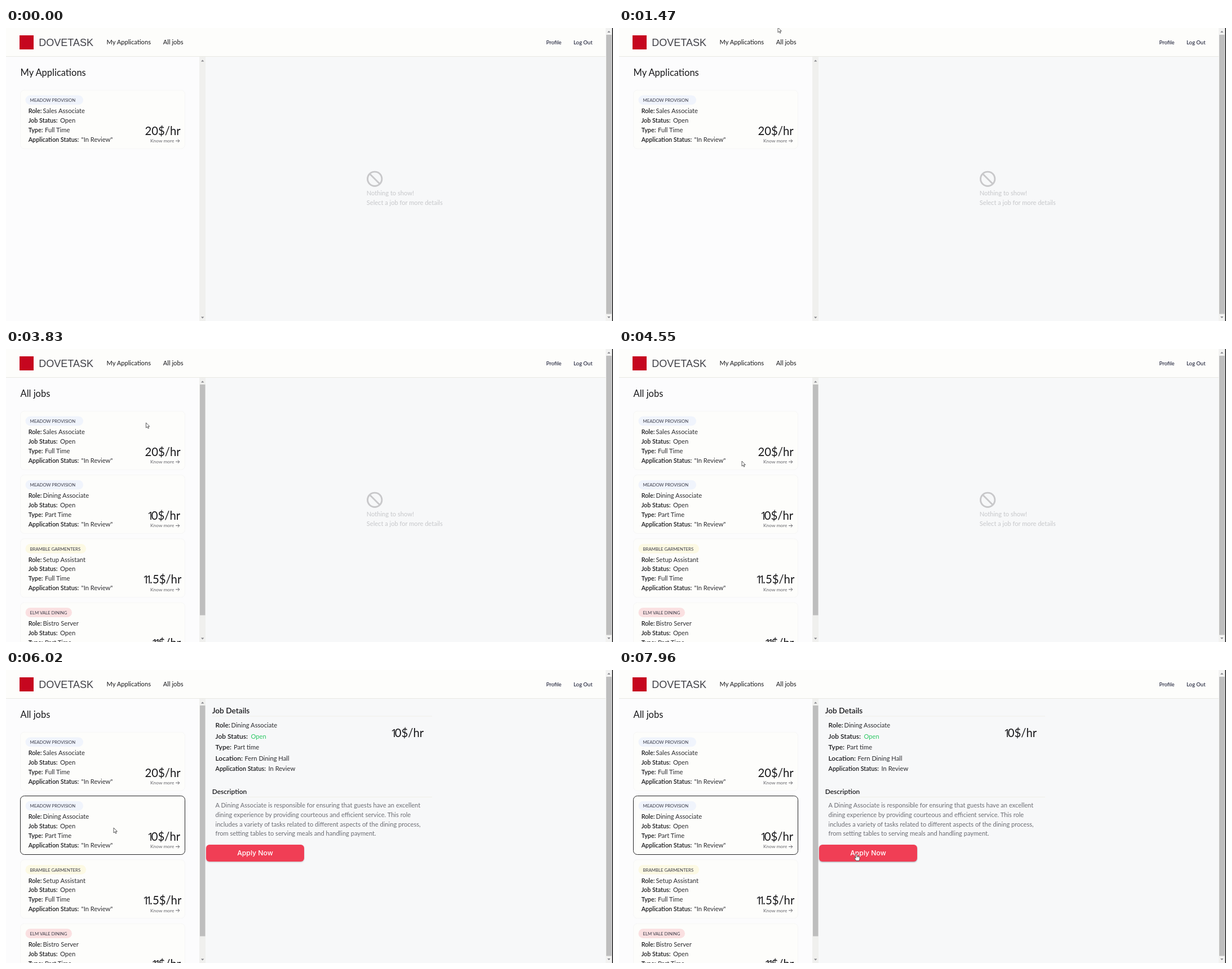
Write an HTML page that moves like this. It is 1077 px wide and 520 px high and loops after 7.99 s.

```html
<!DOCTYPE html>
<html lang="en">
<head>
<meta charset="utf-8">
<title>Job board</title>
<style>
html, body { margin: 0; width: 100%; height: 100%; overflow: hidden; background: #fdfdfc; }
svg { display: block; width: 100%; height: 100%; }
text { font-family: Lato, "Open Sans", sans-serif; fill: #18181b; white-space: pre; }
.brand { font: 18px "Liberation Sans", Arial, sans-serif; fill: #3f3f46; }
.nav { font-size: 11.15px; }
.user { font-size: 9.5px; font-weight: 500; fill: #1e2138; }
.title { font-size: 16.5px; }
.tag { font-size: 7.8px; fill: #3a3b48; }
.label { font-size: 10.8px; font-weight: 600; }
.value { font-size: 11.2px; fill: #2b2b2f; }
.big { font-size: 12px; font-weight: 600; }
.price { font-size: 20.3px; }
.one { font-family: "Open Sans", sans-serif; letter-spacing: -4.6px; }
.more { font-size: 8.4px; fill: #65656b; }
.empty { font-size: 11.1px; fill: #c6c7ca; }
.desc { font-size: 11.1px; fill: #6c6d74; }
.apply { font: 500 12.2px Inter, "Open Sans", sans-serif; fill: #fff; text-anchor: middle; }
</style>
</head>
<body>
<svg id="stage" viewBox="0 0 1077 520" preserveAspectRatio="none"></svg>
<script>
const LOOP = 7990, LIST_AT = 2640, DETAILS_AT = 5350;
const stage = document.getElementById('stage');

const text = (x, y, cls, s, extra = '') =>
  `<text x="${x}" y="${y}" class="${cls}" ${extra}>${s}</text>`;
const rect = (x, y, w, h, fill, extra = '') =>
  `<rect x="${x}" y="${y}" width="${w}" height="${h}" fill="${fill}" ${extra}/>`;
const line = (x1, y, x2, color) =>
  `<path d="M${x1} ${y}H${x2}" stroke="${color}"/>`;
const price = (x, y, s) =>
  text(x, y, 'price', s.replace(/1/g, '<tspan class="one" dx="-1.7">1</tspan>'));
const arrowHead = (x, y, dir) =>
  `<path d="M${x - 2.7} ${y + 1.4 * dir}h5.4l-2.7 ${-2.9 * dir}z" fill="#85858a"/>`;

const MEADOW = { name: 'MEADOW PROVISION', fill: '#f0f4fc', width: 102.5 };
const BRAMBLE = { name: 'BRAMBLE GARMENTERS', fill: '#fcf9e3', width: 107.5 };
const ELM = { name: 'ELM VALE DINING', fill: '#fae0e1', width: 82.5 };
const jobs = [
  { firm: MEADOW, role: 'Sales Associate', type: 'Full Time', pay: '20$/hr', payX: 246.5 },
  { firm: MEADOW, role: 'Dining Associate', type: 'Part Time', pay: '10$/hr', payX: 252.5 },
  { firm: BRAMBLE, role: 'Setup Assistant', type: 'Full Time', pay: '11.5$/hr', payX: 244.5 },
  { firm: ELM, role: 'Bistro Server', type: 'Part Time', pay: '11$/hr', payX: 260 }
];

function card({ firm, role, type, pay, payX }, i) {
  const rows = [
    ['Role:', 65.5, role], ['Job Status:', 96, 'Open'],
    ['Type:', 69, type], ['Application Status:', 133.5, '"In Review"']
  ];
  return `<g transform="translate(0 ${i * 113.25})">
    ${rect(25.5, 110.25, 292, 104, '#fdfdfb', `rx="7" stroke="#f6f6f6" id="card${i}"`)}
    ${rect(34.5, 119.6, firm.width, 16.6, firm.fill, 'rx="8.3"')}
    ${text(42.5, 131, 'tag', firm.name)}
    ${rows.map(([label, x, value], n) =>
      text(39.7, 151 + n * 16.9, 'label', label) + text(x, 151 + n * 16.9, 'value', value)).join('')}
    ${price(payX, 189.6, pay)}
    ${text(256, 203, 'more', 'Know more')}
    <path d="M301 200.3h6.7m-2.8-2.9l2.9 2.9l-2.9 2.9" fill="none" stroke="#55555b" stroke-width=".9"/>
  </g>`;
}

function details() {
  const rows = [
    [102.2, 'big', 'Role:', 399.5, 'Dining Associate'],
    [122, 'big', 'Job Status:', 434.5, 'Open'],
    [141.3, 'big', 'Type:', 404, 'Part time'],
    [160.8, 'big', 'Location:', 423.5, 'Fern Dining Hall'],
    [179, 'label', 'Application Status:', 465.5, 'In Review']
  ];
  const lines = [
    'A Dining Associate is responsible for ensuring that guests have an excellent',
    'dining experience by providing courteous and efficient service. This role',
    'includes a variety of tasks related to different aspects of the dining process,',
    'from setting tables to serving meals and handling payment.'
  ];
  return text(365.7, 77, 'big', 'Job Details', 'style="font-size:13.7px"')
    + line(366, 82, 756, '#efefe8')
    + rows.map(([y, cls, label, x, value]) => text(371.5, y, cls, label)
      + text(x, y, 'value', value, value === 'Open' ? 'style="fill:#2fc866"' : '')).join('')
    + price(684.5, 119.3, '10$/hr')
    + text(365.7, 220, 'big', 'Description')
    + line(366, 225.5, 756, '#efefe8')
    + lines.map((s, i) => text(371.5, 244 + i * 16.8, 'desc', s)).join('')
    + rect(355, 311.5, 174, 29.5, '#8c8c96', 'rx="6" id="shadow" filter="url(#soft)"')
    + rect(355, 310, 174, 30, '#f03e55', 'rx="6"')
    + text(442, 329.3, 'apply', 'Apply Now');
}

stage.innerHTML = `
  <defs><filter id="soft" x="-5%" y="-20%" width="110%" height="150%"><feGaussianBlur stdDeviation="1.2"/></filter></defs>
  ${rect(0, 0, 1077, 520, '#fcfcfd')}
  ${rect(354, 51, 710, 469, '#f7f8f9')}
  ${rect(0, 0, 1064, 50, '#fdfdfb')}
  ${line(0, 50.5, 1064, '#e9e9e3')}
  ${rect(24, 13, 25, 25, '#c6061f')}
  ${text(58.3, 31.5, 'brand', 'DOVETASK')}
  ${text(178.5, 29.4, 'nav', 'My Applications')}
  ${text(278.8, 29.4, 'nav', 'All jobs', 'id="link"')}
  ${text(958.5, 28.8, 'user', 'Profile')}
  ${text(1007, 28.8, 'user', 'Log Out')}
  ${text(25.5, 84.6, 'title', '', 'id="heading"')}
  ${card(jobs[0], 0)}
  <g id="rest">${jobs.slice(1).map((job, i) => card(job, i + 1)).join('')}</g>
  ${rect(343, 51, 11, 469, '#f0f0ee')}
  ${rect(344, 63, 9.5, 409.5, '#bebebe', 'id="thumb"')}
  ${arrowHead(348.7, 58, 1)}${arrowHead(348.7, 514, -1)}
  ${rect(1064, 0, 12, 520, '#f2f2f1')}
  ${rect(1065, 12, 9.5, 495.5, '#bebebe')}
  ${arrowHead(1069.7, 6.5, 1)}${arrowHead(1069.7, 513.5, -1)}
  ${rect(1075.5, 0, 1.5, 520, '#1d1d1f')}
  <g id="empty">
    <g fill="none" stroke="#c8c8ca" stroke-width="2.9"><circle cx="654.2" cy="267.8" r="12.7"/><path d="M645.2 258.8l18 18"/></g>
    ${text(639.8, 297, 'empty', 'Nothing to show!')}
    ${text(639.8, 314, 'empty', 'Select a job for more details')}
  </g>
  <g id="details">${details()}</g>
  <g id="pointer" stroke-linejoin="round" fill="#fff" stroke="#333" stroke-width=".8">
    <path id="arrow" d="M0 0V9l2.1-1.9l1.5 3.1l1.4-.7l-1.5-3h2.8z"/>
    <g id="hand">
      <path d="M-1 .9Q0-.6 1 .9V4.3q1-.7 1.7.1q1-.5 1.7.3q1.5-.3 1.6 1V9q-.4 1.8-1 3H-.3Q-2 9.5-3.4 7.4q.3-1.3 1.5-.6l.9.8z"/>
      <path d="M1 4.3v2.5M2.7 4.5v2.3M4.4 4.9v2" stroke-width=".4"/>
    </g>
    <circle id="click" cx="-.5" cy=".5" r="2.3" fill="#e7564f" fill-opacity=".75" stroke="none"/>
  </g>`;

const part = {};
stage.querySelectorAll('[id]').forEach(el => part[el.id] = el);
const show = (el, on) => el.setAttribute('visibility', on ? 'visible' : 'hidden');

// time, x, y of the pointer tip
const path = [
  [1400, 280, -12], [1470, 282, -1], [1900, 296, 24.5], [3200, 296, 24.5],
  [4300, 218, 199], [4700, 218, 199], [5200, 191, 280], [6100, 191, 280],
  [6850, 418, 325.5], [7000, 418, 325.5], [7500, 421, 326.5], [LOOP, 421, 326.5]
];

function pointerAt(t) {
  const i = path.findIndex(p => t < p[0]);
  if (i < 1) return path[0].slice(1);
  const [t0, x0, y0] = path[i - 1], [t1, x1, y1] = path[i];
  const u = (t - t0) / (t1 - t0), k = u * u * (3 - 2 * u);
  return [x0 + (x1 - x0) * k, y0 + (y1 - y0) * k];
}

const clicked = (t, at) => t > at - 60 && t < at + 200;

function draw(t) {
  const listed = t >= LIST_AT, opened = t >= DETAILS_AT;
  const [x, y] = pointerAt(t);
  const onLink = x > 277 && x < 315 && y > 16 && y < 35;
  const onButton = opened && x > 355 && x < 529 && y > 310 && y < 340;
  const hand = onLink || onButton;

  part.heading.textContent = listed ? 'All jobs' : 'My Applications';
  part.link.style.fill = onLink ? '#85858c' : '#18181b';
  show(part.rest, listed);
  show(part.thumb, listed);
  show(part.empty, !opened);
  show(part.details, opened);
  part.card1.setAttribute('stroke', opened ? '#242426' : '#f6f6f6');
  part.shadow.setAttribute('opacity', onButton ? .8 : .5);

  part.pointer.setAttribute('transform', `translate(${x} ${y})`);
  show(part.arrow, t >= 1400 && !hand);
  show(part.hand, hand);
  show(part.click, clicked(t, LIST_AT) || clicked(t, DETAILS_AT));
}

const start = performance.now();
function tick() {
  draw((performance.now() - start) % LOOP);
  requestAnimationFrame(tick);
}
draw(0);
requestAnimationFrame(tick);
</script>
</body>
</html>
```
